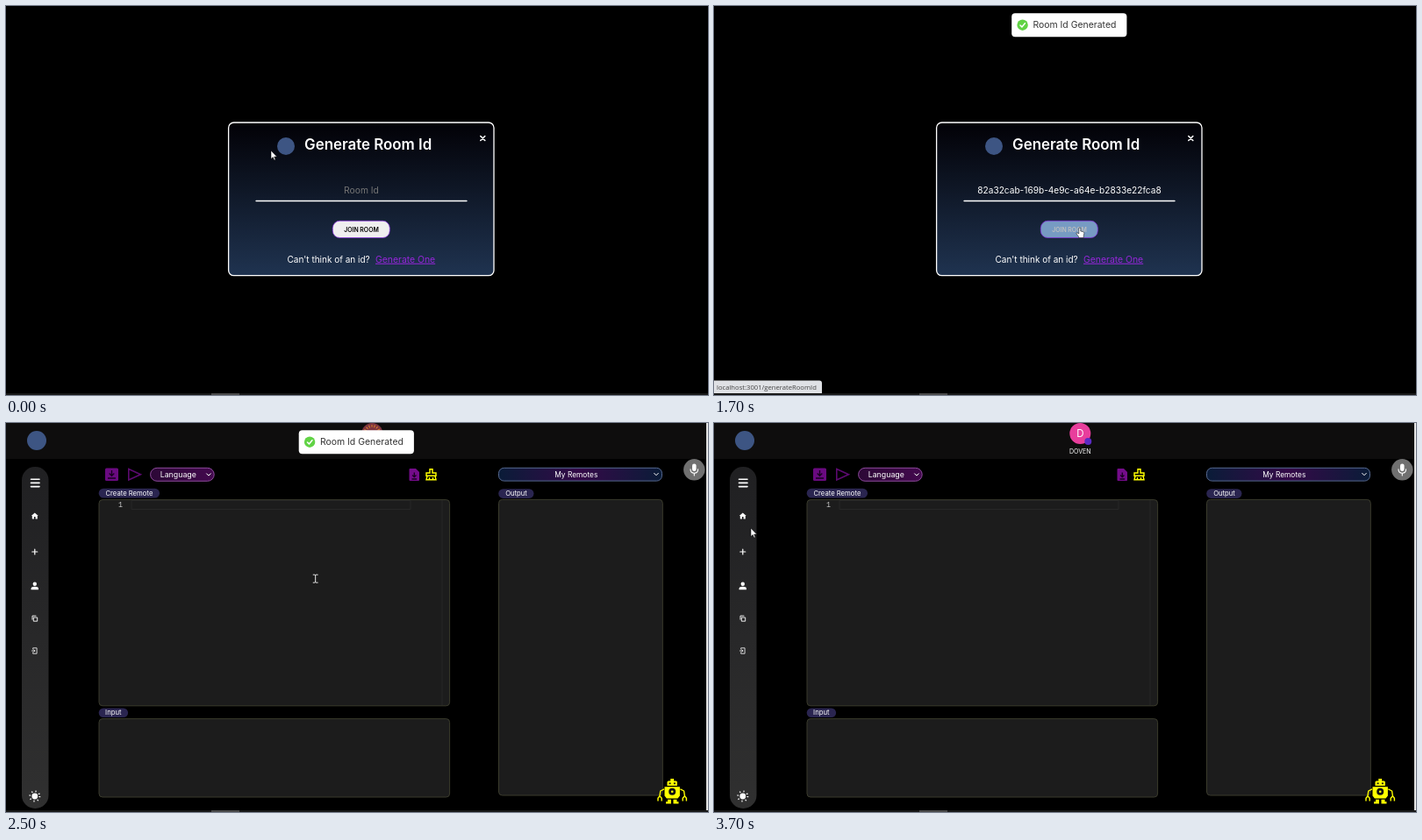
An HTML page for the animation above (3.8 s loop, 800 px wide and 444 px high).

```html
<!DOCTYPE html>
<html lang="en">
<head>
<meta charset="utf-8">
<title>Room</title>
<style>
html, body { margin: 0; width: 100%; height: 100%; overflow: hidden; background: #000; }
svg { display: block; font-family: Inter, "Open Sans", sans-serif; fill: #fff; }
.mid { text-anchor: middle; }
.line { fill: none; stroke: #fff; stroke-linecap: round; stroke-linejoin: round; }
.pill { fill: #2a2550; }
.tag { font-size: 7.7px; }
.box { fill: #1c1c1c; stroke: #3a3b2c; }
.cut { fill: none; stroke: #180020; stroke-width: 1.3; }
.yellow { fill: none; stroke: #ff0; stroke-width: 1.4; }
</style>
</head>
<body>
<svg width="800" height="444" viewBox="0 0 800 444">
  <defs>
    <linearGradient id="night" x2="0" y2="1">
      <stop stop-color="#020106"/><stop offset="1" stop-color="#1f3350"/>
    </linearGradient>
    <linearGradient id="bar" x2="0" y2="1">
      <stop stop-color="#202022"/><stop offset="1" stop-color="#303030"/>
    </linearGradient>
    <linearGradient id="plum">
      <stop stop-color="#2c0836"/><stop offset="1" stop-color="#43094e"/>
    </linearGradient>
    <linearGradient id="dusk">
      <stop stop-color="#0a1c38"/><stop offset=".5" stop-color="#340a48"/><stop offset="1" stop-color="#0a1c38"/>
    </linearGradient>
  </defs>
  <rect width="800" height="444" fill="#000"/>

  <g id="dialog">
    <rect x="253.6" y="133" width="302.4" height="174.7" rx="6" fill="url(#night)" stroke="#fff" stroke-width="1.3"/>
    <circle cx="319" cy="160" r="10" fill="#3d5583"/>
    <text x="340" y="164" font-size="16.9" font-weight="600">Generate Room Id</text>
    <path class="line" stroke-width="1.6" d="M540.8 148.5l5 5m0-5l-5 5"/>
    <text id="field" class="mid" x="405" y="214"></text>
    <path class="line" stroke-width="1.3" d="M285 222.5H525"/>
    <rect id="join" x="372.3" y="245.3" width="65" height="19.2" rx="8" stroke="#8a2be2" stroke-width=".7"/>
    <text id="joinText" class="mid" x="405" y="257.5" font-size="6.9" font-weight="600">JOIN ROOM</text>
    <text x="320.5" y="292.7" font-size="10">Can't think of an id?</text>
    <text x="421" y="292.7" font-size="10.4" fill="#9426d8" text-decoration="underline">Generate One</text>
  </g>

  <g id="status">
    <path d="M0 427.5H120q3 0 3 3V442H0Z" fill="#dfe1e5"/>
    <text x="3" y="437.6" font-size="7.65" font-family="Open Sans, Noto Sans, sans-serif" fill="#444">localhost:3001/generateRoomId</text>
  </g>

  <g id="app">
    <rect width="798" height="41" fill="#0e0d0d"/>
    <rect x="798" width="2" height="442" fill="#e4e4e4"/>
    <circle cx="35" cy="20" r="11" fill="#3d5583"/>

    <rect x="18" y="50" width="30.5" height="390" rx="15" fill="url(#bar)"/>
    <path class="line" stroke-width="1.6" d="M28.5 64.2h9.5m-9.5 4.2h9.5m-9.5 4.2h9.5"/>
    <path d="M32.8 102.4l4 3.7h-1v3.5h-2.2v-2.5h-1.6v2.5h-2.2v-3.5h-1Z"/>
    <path class="line" stroke-width="1.2" d="M29.8 147h6m-3-3v6"/>
    <circle cx="32.8" cy="183.8" r="2.2"/>
    <path d="M28.6 190.3v-1.1q0-2.4 4.2-2.4t4.2 2.4v1.1Z"/>
    <path class="line" stroke-width=".9" d="M31.7 222h4v4.2h-4ZM30 224.2v-4.1h4"/>
    <path class="line" stroke-width=".8" d="M30.7 258v-1.2h4.4v6.4h-4.4V262M29.5 260h3.4m-1.2-1.2l1.2 1.2-1.2 1.2"/>
    <circle cx="32.8" cy="426" r="3.4"/>
    <circle cx="32.8" cy="426" r="5.6" class="line" stroke-width="1.8" style="stroke-linecap:butt" stroke-dasharray="1.2 3.2"/>

    <g id="left">
      <rect x="126" y="51.5" width="15" height="14.5" rx="1.5" fill="#6a0a80"/>
      <path class="cut" d="M133.5 54v6m-2.8-2.5l2.8 2.8 2.8-2.8M129 63h9"/>
      <path d="M152.8 52.6L166.4 58.7L152.8 65Z" fill="none" stroke="#5c0a70" stroke-width="1.6"/>
      <rect x="177.6" y="51.3" width="72.6" height="15" rx="7.5" fill="url(#plum)" stroke="#8d4a9c"/>
      <text class="mid" x="209.3" y="61.8" font-size="8.8">Language</text>
      <path class="line" stroke-width="1" d="M241.6 57.8l2.3 2.3 2.3-2.3"/>
      <path d="M473.5 52h6.5l4 4v9q0 1-1 1h-9.5q-1 0-1-1V53q0-1 1-1Z" fill="#740c8a"/>
      <path class="cut" d="M478.3 56.5v5m-2.2-2l2.2 2.2 2.2-2.2M475.5 64h5.6"/>
      <path class="yellow" d="M496 57v-4.3h3V57h4v3.3h-11V57ZM493 60.5l-1 4.3h11l-1-4.3M495.5 64.5V62m4 2.5V62"/>
      <rect class="pill" x="118.7" y="74.8" width="69.3" height="10.7" rx="5.3"/>
      <text class="tag mid" x="153.4" y="82.6">Create Remote</text>
      <g id="editor">
        <rect class="box" x="119" y="87.6" width="399.6" height="235.2" rx="4"/>
        <path d="M156 88.4H474V98.5H156ZM510 88V322" fill="none" stroke="#272727"/>
        <text x="141" y="96.2" font-size="8.3" font-family="Liberation Mono, monospace" fill="#ccc">1</text>
      </g>
      <rect class="pill" x="118.7" y="325.4" width="33.4" height="10.6" rx="5.3"/>
      <text class="tag mid" x="135.3" y="333.2">Input</text>
      <rect class="box" x="119" y="337.6" width="399.6" height="89.4" rx="4"/>
    </g>

    <g id="right">
      <rect x="588" y="51.3" width="186" height="14.8" rx="6" fill="url(#dusk)" stroke="#56688f"/>
      <text class="mid" x="676.3" y="61.6" font-size="8.4">My Remotes</text>
      <path class="line" stroke-width="1" d="M765.2 57.4l2.3 2.3 2.3-2.3"/>
      <rect class="pill" x="587.7" y="75.2" width="40.3" height="10.7" rx="5.3"/>
      <text class="tag mid" x="608" y="83">Output</text>
      <rect class="box" x="588" y="87.4" width="186.8" height="337.6" rx="4"/>
    </g>

    <g id="robot" fill="#ff0">
      <path d="M753.5 414V410q0-1.5 1.5-1.5h2.3V406h3.8v2.5h2.3q1.5 0 1.5 1.5v4ZM750.5 415.3h17.4v10.2l-2.4 3h-12.6l-2.4-3ZM754 429.8h4v4.7h-6v-2.2h2ZM760.5 429.8h4v2.5h2v2.2h-6Z"/>
      <path class="yellow" stroke-linejoin="round" d="M750 417.8l-4.2 2.2-.8 5.5m-2 6v-3.3l2-2.4 2.2 2.4v3.3M768.4 417.8l4.2 2.2.8 5.5m-2.2 6v-3.3l2.2-2.4 2 2.4v3.3"/>
      <path d="M755.6 410.6h2v1.6h-2ZM760.9 410.6h2v1.6h-2Z" fill="#111"/>
      <circle cx="759.2" cy="420.8" r="4" fill="#111"/>
      <circle cx="759.2" cy="420.8" r="1.3"/>
    </g>

    <g id="mic">
      <circle cx="784.3" cy="53.3" r="12.2" fill="#707070"/>
      <rect x="782" y="46.5" width="4.6" height="8.6" rx="2.3"/>
      <path class="line" stroke-width="1.1" d="M780 52.8q0 4.4 4.3 4.4t4.3-4.4M784.3 57.2v2.8"/>
    </g>

    <g id="user">
      <circle id="face" cx="417.3" cy="12" r="12"/>
      <circle id="dots" cx="417.3" cy="12" r="8.5" fill="none" stroke="#d9822b" stroke-width="3" stroke-dasharray="1 2"/>
      <g id="label">
        <text class="mid" x="417.3" y="16" font-size="11.5">D</text>
        <circle cx="426.3" cy="21" r="4" fill="#5b2bc4"/>
        <text class="mid" x="417.3" y="34.6" font-size="7">DOVEN</text>
      </g>
    </g>
  </g>

  <g id="toast">
    <rect x="339.2" y="8.2" width="131.2" height="27" rx="4"/>
    <circle cx="351.6" cy="21.7" r="6.2" fill="#61d345"/>
    <path class="line" stroke-width="1.5" d="M349 22l1.9 1.9 3.5-4.2"/>
    <text x="363.4" y="25.2" font-size="10.45" fill="#363636">Room Id Generated</text>
  </g>

  <rect y="442" width="800" height="2" fill="#191919"/>
  <rect x="234" y="442" width="32" height="2" fill="#4a4a4a"/>

  <g id="pointer">
    <path id="arrow" d="M0 0V9.6L2.2 7.6L3.7 11L5.1 10.4L3.7 7.1H6.7Z" stroke="#000" stroke-width=".5"/>
    <path id="hand" d="M-1.2 1Q-1.2 0 -.2 0T.8 1V4L4 4.8Q5 5.2 4.8 6.5L4.2 9.5V11.5H-1.4V10.2L-4 7Q-4.4 5.8 -3.2 5.8L-1.2 7Z" stroke="#000" stroke-width=".5"/>
    <path id="beam" class="line" stroke-width=".9" d="M-2.5 -4.5H-.8L0 -4 .8 -4.5H2.5M0 -4V4M-2.5 4.5H-.8L0 4 .8 4.5H2.5"/>
  </g>
</svg>
<script>
const LOOP = 3800, STEP = 100;
// time, x, y
const path = [
  [0, 302, 165], [200, 284, 157], [600, 452, 284], [1000, 450, 287], [1200, 450, 287],
  [1500, 418, 254], [1700, 417, 253], [2100, 417, 253], [2200, 415, 251], [2300, 412, 243],
  [2600, 323, 145], [3400, 308, 141], [3600, 112, 128], [3700, 42, 120]
];
const $ = id => document.getElementById(id);
const show = (id, on) => $(id).style.display = on ? "" : "none";
const move = (id, x, y = 0) => $(id).setAttribute("transform", `translate(${x} ${y})`);
const paint = (id, color) => $(id).setAttribute("fill", color);
const clamp = v => Math.max(0, Math.min(1, v));
const easeOut = p => 1 - (1 - p) ** 4;
const mix = (a, b, p) => a + (b - a) * p;
const blend = (a, b, p) => `rgb(${a.map((v, i) => Math.round(mix(v, b[i], p)))})`;

function pointerAt(t) {
  const i = Math.max(1, path.findIndex(k => k[0] >= t));
  const [t0, x0, y0] = path[i - 1], [t1, x1, y1] = path[i];
  const p = (t - t0) / (t1 - t0);
  return [mix(x0, x1, p), mix(y0, y1, p)];
}

function drawToast(t, inApp) {
  const enter = easeOut(clamp((t - 1300) / 350));
  const leave = easeOut(clamp((t - 3300) / 400));
  const y = -54 * (1 - enter) - 41 * leave;
  const size = 0.6 + 0.4 * (enter - leave);
  const x = inApp ? 399.3 : 404.8;
  show("toast", t >= 1300 && leave < 1);
  $("toast").setAttribute("transform", `translate(${x} ${21.7 + y}) scale(${size}) translate(-404.8 -21.7)`);
  $("toast").setAttribute("opacity", (0.5 + 0.5 * enter) * (1 - leave));
}

function draw(t) {
  const inApp = t >= 2300, ready = t >= 2500, named = t >= 2700, filled = t >= 1200;
  show("dialog", !inApp);
  show("app", inApp);
  show("status", filled && t < 1800);

  $("field").textContent = filled ? "82a32cab-169b-4e9c-a64e-b2833e22fca8" : "Room Id";
  $("field").setAttribute("font-size", filled ? 10.15 : 10.3);
  paint("field", filled ? "#fff" : "#757575");

  const hover = clamp((t - 1400) / 400);
  paint("join", blend([239, 239, 239], [79, 127, 180], hover));
  paint("joinText", blend([0, 0, 0], [255, 255, 255], hover));

  for (const id of ["editor", "mic", "user"]) show(id, ready);
  move("left", ready ? -13 : 0);
  move("right", ready ? -26.5 : 0);
  paint("face", named ? "#e83e9c" : "#7d3540");
  show("dots", !named);
  show("label", named);

  drawToast(t, inApp);

  const kind = t >= 600 && t < 2200 ? "hand" : t >= 2500 && t < 3700 ? "beam" : "arrow";
  for (const id of ["arrow", "hand", "beam"]) show(id, id === kind);
  move("pointer", ...pointerAt(t));
}

const start = performance.now();
function tick() {
  const t = (performance.now() - start) % LOOP;
  draw(Math.floor(t / STEP) * STEP);
  requestAnimationFrame(tick);
}
tick();
</script>
</body>
</html>
```
